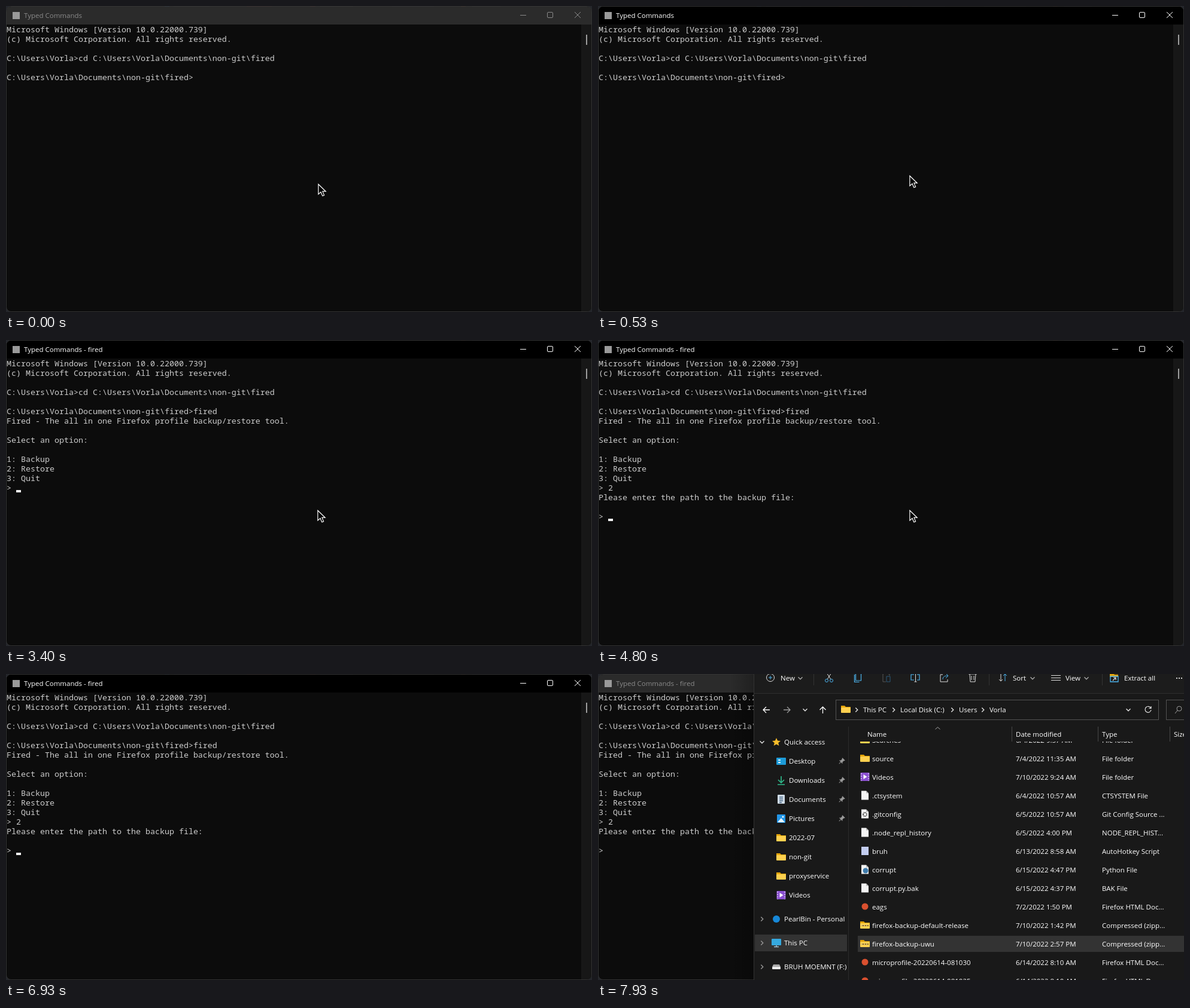
These frames come from a looping animation (979 by 512 pixels, 8000 ms). An HTML page:

```html
<!DOCTYPE html>
<html lang="en">
<head>
<meta charset="utf-8">
<title>Terminal session</title>
<style>
  html, body { margin: 0; width: 979px; height: 512px; overflow: hidden; background: #16181c; }
  svg { display: block; }
  text { font: 11.5px "Open Sans", "Noto Sans", sans-serif; fill: #fff; white-space: pre; }
  .mono { font: 13.3333px "Noto Sans Mono", "DejaVu Sans Mono", monospace; fill: #ccc; }
</style>
</head>
<body>
<svg id="stage" width="979" height="512" viewBox="0 0 979 512"></svg>
<script>
const LOOP = 8000;
const USER = 'Vorla';
const FOLDER = `C:\\Users\\${USER}\\Documents\\non-git\\fired`;

// Drawing helpers
const rect = (x, y, w, h, fill, extra = '') =>
  `<rect x="${x}" y="${y}" width="${w}" height="${h}" fill="${fill}" ${extra}/>`;
const text = (x, y, value, extra = '') => `<text x="${x}" y="${y}" ${extra}>${value}</text>`;
const line = (d, color = '#e8e8e8', width = 1, dash = 'none') =>
  `<path d="${d}" fill="none" stroke="${color}" stroke-width="${width}" stroke-dasharray="${dash}"/>`;
const shape = (d, fill) => `<path d="${d}" fill="${fill}"/>`;
const dot = (x, y, r, fill) => `<circle cx="${x}" cy="${y}" r="${r}" fill="${fill}"/>`;
const down = (x, y, color) => line(`M${x - 3.5} ${y - 1.7}l3.5 3.5 3.5-3.5`, color, 1.3);
const right = (x, y, color) => line(`M${x - 1.7} ${y - 3.5}l3.5 3.5-3.5 3.5`, color, 1.3);

// Icons, centred on x, y
const icons = {
  folder: (x, y) => shape(`M${x - 8} ${y - 6}h6l2 2h8v4h-16z`, '#e5a50a') +
    rect(x - 8, y - 3, 16, 9, '#ffd04f', 'rx="1"'),
  zip: (x, y) => icons.folder(x, y) +
    line(`M${x - 6} ${y + 1}h12`, '#8a6a1c', 2) + line(`M${x - 6} ${y + 1}h12`, '#f5f0dc', 1, 2),
  page: (x, y) => shape(`M${x - 6} ${y - 7.5}h8l4 4v11h-12z`, '#f4f4f4') +
    shape(`M${x + 2} ${y - 7.5}v4h4z`, '#b5b5b5'),
  gear: (x, y) => icons.page(x, y) +
    line(`M${x - 3} ${y + 1}a3 3 0 1 1 6 0a3 3 0 1 1-6 0`, '#555', 2, '1.6 .8'),
  script: (x, y) => rect(x - 6, y - 7, 12, 14, '#c3cdf0'),
  python: (x, y) => icons.page(x, y) + dot(x + 1, y + 2, 4.5, '#3f7cac'),
  web: (x, y) => dot(x, y, 5.5, '#d9502f'),
  video: (x, y) => rect(x - 7.5, y - 7, 15, 14, '#8a4fd0', 'rx="1"') +
    line(`M${x - 6} ${y - 6}v13M${x + 6} ${y - 6}v13`, '#d9c2f5', 1.5, 2) +
    shape(`M${x - 2.5} ${y - 4}l6 4-6 4z`, '#fff'),
  desktop: (x, y) => rect(x - 8, y - 6, 16, 12, '#1d9bd8', 'rx="1"') +
    rect(x - 5, y - 3, 4, 2, '#d5f2ff') + rect(x - 5, y + 1, 4, 2, '#d5f2ff'),
  download: (x, y) => line(`M${x} ${y - 7}v11m-5-5l5 5 5-5M${x - 6} ${y + 7}h12`, '#2fb98a', 1.7),
  document: (x, y) => rect(x - 6, y - 8, 12, 15, '#cfdbe6', 'rx="1"') +
    line(`M${x - 3} ${y - 4}h6m-6 3h6m-6 3h6m-6 3h4`, '#4b6a86', 1.3),
  picture: (x, y) => rect(x - 7, y - 7, 14, 14, '#2296e8', 'rx="1"') +
    shape(`M${x - 6} ${y + 6}l6-7 6 7z`, '#e9f6ff') + dot(x + 3, y - 3, 1.5, '#fff'),
  cloud: (x, y) => dot(x, y, 6, '#1788d8'),
  pc: (x, y) => rect(x - 8, y - 7, 16, 11, '#35a9df', 'rx="1"') +
    line(`M${x} ${y + 4}v2.5m-4 0h8`, '#9fc4d8', 1.5),
  disk: (x, y) => shape(`M${x - 5} ${y - 4}h10l2 4h-14z`, '#aaa') + rect(x - 7, y, 14, 4, '#eee', 'rx="1"'),
  star: (x, y) => shape(`M${x} ${y - 7}l2 4.5 5 .5-3.8 3.3 1.2 4.8-4.4-2.6-4.4 2.6 1.2-4.8-3.8-3.3 5-.5z`, '#f9bd2b'),
};

// File manager window
const files = [
  ['folder', 'Searches', '6/4/2022 9:57 AM', 'File folder'],
  ['folder', 'source', '7/4/2022 11:35 AM', 'File folder'],
  ['video', 'Videos', '7/10/2022 9:24 AM', 'File folder'],
  ['page', '.ctsystem', '6/4/2022 10:57 AM', 'CTSYSTEM File'],
  ['gear', '.gitconfig', '6/5/2022 10:57 AM', 'Git Config Source ...'],
  ['page', '.node_repl_history', '6/5/2022 4:00 PM', 'NODE_REPL_HIST...'],
  ['script', 'bruh', '6/13/2022 8:58 AM', 'AutoHotkey Script'],
  ['python', 'corrupt', '6/15/2022 4:47 PM', 'Python File'],
  ['page', 'corrupt.py.bak', '6/15/2022 4:37 PM', 'BAK File'],
  ['web', 'eags', '7/2/2022 1:50 PM', 'Firefox HTML Doc...'],
  ['zip', 'firefox-backup-default-release', '7/10/2022 1:42 PM', 'Compressed (zipp...'],
  ['zip', 'firefox-backup-uwu', '7/10/2022 2:57 PM', 'Compressed (zipp...'],
  ['web', 'microprofile-20220614-081030', '6/14/2022 8:10 AM', 'Firefox HTML Doc...'],
  ['web', 'microprofile-20220614-081025', '6/14/2022 8:10 AM', 'Firefox HTML Doc...'],
];
const pinned = [
  ['desktop', 'Desktop'], ['download', 'Downloads'], ['document', 'Documents'], ['picture', 'Pictures'],
  ['folder', '2022-07'], ['folder', 'non-git'], ['folder', 'proxyservice'], ['video', 'Videos'],
];
const roots = [['cloud', 'PearlBin - Personal'], ['pc', 'This PC'], ['disk', 'BRUH MOEMNT (F:)']];
const crumbs = [[443, 'This PC'], [505, 'Local Disk (C:)'], [603, 'Users'], [654, USER]];

const pin = y => `<g transform="translate(407 ${y}) rotate(45)">` +
  shape('M-3-5h6v1l-1 1v3l2 2h-8l2-2v-3l-1-1z', '#999') + line('M0 2v4', '#999') + '</g>';

const toolbar = () => {
  const blue = '#4cb4ee', grey = '#ddd', dim = '#2c5878';
  return `<circle cx="288" cy="6" r="6.5" fill="none" stroke="${grey}"/>` + line('M288 3v6m-3-3h6', blue) +
    text(305, 11, 'New') + down(338, 7, '#aaa') +
    line('M382-2l7 11M390-2l-7 11', grey) +
    `<g fill="none" stroke="${blue}"><circle cx="382" cy="11" r="2.5"/><circle cx="390" cy="11" r="2.5"/></g>` +
    line('M430.5-2h9v13h-9z', blue, 1.2) + line('M428.5 1v12.5h8', blue, 1.2) +
    line('M477 0h-1v13h5M485 0h2v3', '#555') + line('M482 4h6v9h-6z', dim) +
    line('M528 1h-5v9h5m5 0h4v-9h-4', blue, 1.2) + line('M530.5-2v15m-2 0h4', grey) +
    line('M576 1h-4v12h12v-4', grey) + line('M576 9c0-5 4-6 8-6m-3-4l4 4-4 4', blue) +
    line('M619 0h14m-12 0l1 13h8l1-13m-7 3v7m4-7v7', grey) +
    line('M360.5 0v19M653.5 0v19M842.5 0v19', '#333') +
    line('M673 0v12m-3-3l3 3 3-3', grey) + line('M680 12v-12m-3 3l3-3 3 3', blue) +
    text(693, 11, 'Sort') + down(726, 7, '#aaa') +
    line('M757 2.5h16m-16 4h16m-16 4h16', grey) + text(781, 11, 'View') + down(816, 7, '#aaa') +
    shape('M855-1h6l2 2h6v4h-14z', '#e5a50a') + line('M856 4v9h13v-9z', blue, 1.3) +
    line('M860 11l5-5m-4 0h4v4', grey, 1.2) +
    text(879, 11, 'Extract all') + [967, 971, 975].map(x => dot(x, 7, 1.1, '#fff')).join('');
};

const addressBar = () =>
  line('M287 60h-11m5-5l-5 5 5 5', '#fff', 1.3) + line('M310 60h11m-5-5l5 5-5 5', '#999', 1.3) + down(346, 60) +
  line('M375.5 66v-11m-5 5l5-5 5 5', '#fff', 1.3) +
  rect(397.5, 43.5, 539, 33, '#191919', 'stroke="#535353"') +
  rect(949.5, 43.5, 60, 33, '#191919', 'stroke="#535353"') +
  icons.folder(414, 59) + crumbs.map(([x, name]) => right(x - 11, 60) + text(x, 64, name)).join('') +
  down(886, 60) + line('M923.5 57a5 5 0 1 0 .5 3m0-6v3.5h-3.5', '#e8e8e8', 1.2) +
  '<circle cx="971" cy="58" r="4" fill="none" stroke="#999"/>' + line('M968 61l-4 5', '#999');

const sidebar = () =>
  rect(262, 436, 154, 28, '#333') + down(274, 114) + icons.star(298, 114) + text(311, 118, 'Quick access') +
  pinned.map(([icon, name], i) => {
    const y = 146 + 32 * i;
    return icons[icon](306, y) + text(319, y + 4, name) + (i < 4 ? pin(y) : '');
  }).join('') +
  roots.map(([icon, name], i) => {
    const y = 410 + 40 * i;
    return right(274, y, '#999') + icons[icon](298, y) + text(311, y + 4, name);
  }).join('');

const fileList = () => files.map(([icon, name, date, type], i) => {
  const y = 111 + 31 * i;
  return (name === 'firefox-backup-uwu' ? rect(434, y - 14, 545, 27, '#333') : '') +
    icons[icon](446, y - 1) + text(458, y + 4, name) + text(698, y + 4, date) + text(842, y + 4, type);
}).join('');

const explorer = `
  <defs>
    <linearGradient id="shade"><stop stop-opacity="0"/><stop offset="1" stop-opacity=".25"/></linearGradient>
    <clipPath id="side"><path d="M260 80h156v432h-156z"/></clipPath>
    <clipPath id="list"><path d="M420 113h559v399h-559z"/></clipPath>
  </defs>` +
  rect(220, 0, 40, 512, 'url(#shade)') + rect(260, 0, 719, 512, '#191919') + rect(260, 0, 719, 32, '#1c1c1c') +
  line('M260 32.5h719', '#2e2e2e') + line('M260.5 0v512', '#333') +
  toolbar() + addressBar() + `<g clip-path="url(#side)">${sidebar()}</g>` +
  line('M418.5 88v424', '#2b2b2b') + line('M691.5 88v25M835.5 88v25M955.5 88v25', '#484848') +
  line('M563.5 92.5l4-3.5 4 3.5', '#aaa') +
  [[450, 'Name'], [698, 'Date modified'], [842, 'Type'], [962, 'Size']].map(([x, s]) => text(x, 105, s)).join('') +
  `<g clip-path="url(#list)">${fileList()}</g>`;

// Console window
const intro = [
  'Microsoft Windows [Version 10.0.22000.739]',
  '(c) Microsoft Corporation. All rights reserved.', '',
  `C:\\Users\\${USER}&gt;cd ${FOLDER}`, '',
];
const menu = ['Fired - The all in one Firefox profile backup/restore tool.', '',
  'Select an option:', '', '1: Backup', '2: Restore', '3: Quit'];
const question = ['Please enter the path to the backup file:', '', '&gt;'];

// Slivers of the window behind, along the top edge: x, width, colour
const behind = [[265, 8, '#2a5fa8'], [280, 60, '#4a4c50'], [402, 42, '#7a3434'], [508, 9, '#8c3a3a'],
  [524, 56, '#4a4c50'], [645, 70, '#46484c'], [760, 8, '#8c4a2a'], [778, 48, '#4a4c50'], [876, 85, '#3f4146']];

function consoleWindow({ active, running, typed, showMenu, choice, asked, caret }) {
  const rows = [...intro, `${FOLDER}&gt;${typed}`,
    ...(showMenu ? [...menu, `&gt; ${choice}`] : []), ...(asked ? question : [])];
  const ink = active ? '#fff' : '#8a8a8a';
  return rect(0, 0, 979, 512, '#24262b') +
    `<g opacity="${active ? .6 : 1}">${behind.map(([x, w, fill]) => rect(x, 0, w, 1, fill)).join('')}</g>` +
    rect(.5, .5, 978, 511, '#0c0c0c', 'rx="8" stroke="#3a3a3a" stroke-opacity=".8"') +
    shape('M1 31V9q0-8 8-8h961q8 0 8 8v22z', active ? '#000' : '#2b2b2b') +
    rect(11, 10, 12, 12, '#9a9a9a') +
    text(30, 20, 'Typed Commands' + (running ? ' - fired' : ''), `style="fill:${ink}"`) +
    line('M859 15.5h10M950 10l10 10m0-10l-10 10', ink) +
    rect(904.5, 10.5, 9, 9, 'none', `rx="1.5" stroke="${ink}"`) +
    shape('M961 31h17v473q0 7-7 7h-10z', '#171717') + rect(969, 48, 2, 17, '#9f9f9f') +
    rows.map((row, i) => text(1, 44 + 16 * i, row, 'class="mono"')).join('') +
    (caret ? rect(1 + 8 * caret[0], 43 + 16 * caret[1], 8, 4, '#f2f2f2') : '');
}

const pointer = ([x, y]) => `<path transform="translate(${x} ${y})" fill="#000" stroke="#fff" stroke-width="1.2"
  d="M.9 1.2V18L5 14.2 7.8 20.8 10.6 19.6 7.9 13.2H13.2Z"/>`;

// Each event changes part of the state from its time on
const type = (time, typed) => [time, { typed, caret: [39 + typed.length, 5] }];
const events = [
  [0, { active: false, running: false, typed: '', showMenu: false, choice: '', asked: false,
    caret: null, mouse: [521, 297], files: false }],
  [70, { mouse: [521, 292] }],
  [130, { mouse: [520, 286] }],
  [200, { mouse: [520, 283] }],
  [530, { active: true }],
  [870, { mouse: [520, 284] }],
  [1130, { caret: [39, 5] }],
  [1670, { caret: null }],
  type(1800, 'f'), type(1870, 'fi'), type(2000, 'fir'), type(2070, 'fire'), type(2200, 'fired'), type(2330, 'fired '),
  [2670, { caret: null }],
  [3070, { running: true, caret: [0, 6] }],
  [3200, { caret: null }],
  [3400, { showMenu: true, caret: [2, 13] }],
  [4270, { caret: null }],
  [4600, { choice: '2', caret: [3, 13] }],
  [4800, { asked: true, caret: [2, 16] }],
  [5330, { caret: null }],
  [5470, { mouse: [532, 350] }],
  [5530, { mouse: [564, 478] }],
  [5600, { mouse: null }],
  [5870, { caret: [2, 16] }],
  [6400, { caret: null }],
  [6930, { caret: [2, 16] }],
  [7070, { active: false, caret: null }],
  [7930, { files: true }],
];

const stage = document.getElementById('stage');
let shown = 0;
function draw() {
  const t = performance.now() % LOOP;
  const past = events.filter(([time]) => time <= t);
  if (past.length !== shown) {
    shown = past.length;
    const state = Object.assign({}, ...past.map(([, change]) => change));
    stage.innerHTML = consoleWindow(state) + (state.files ? explorer : '') + (state.mouse ? pointer(state.mouse) : '');
  }
  requestAnimationFrame(draw);
}
draw();
</script>
</body>
</html>
```
